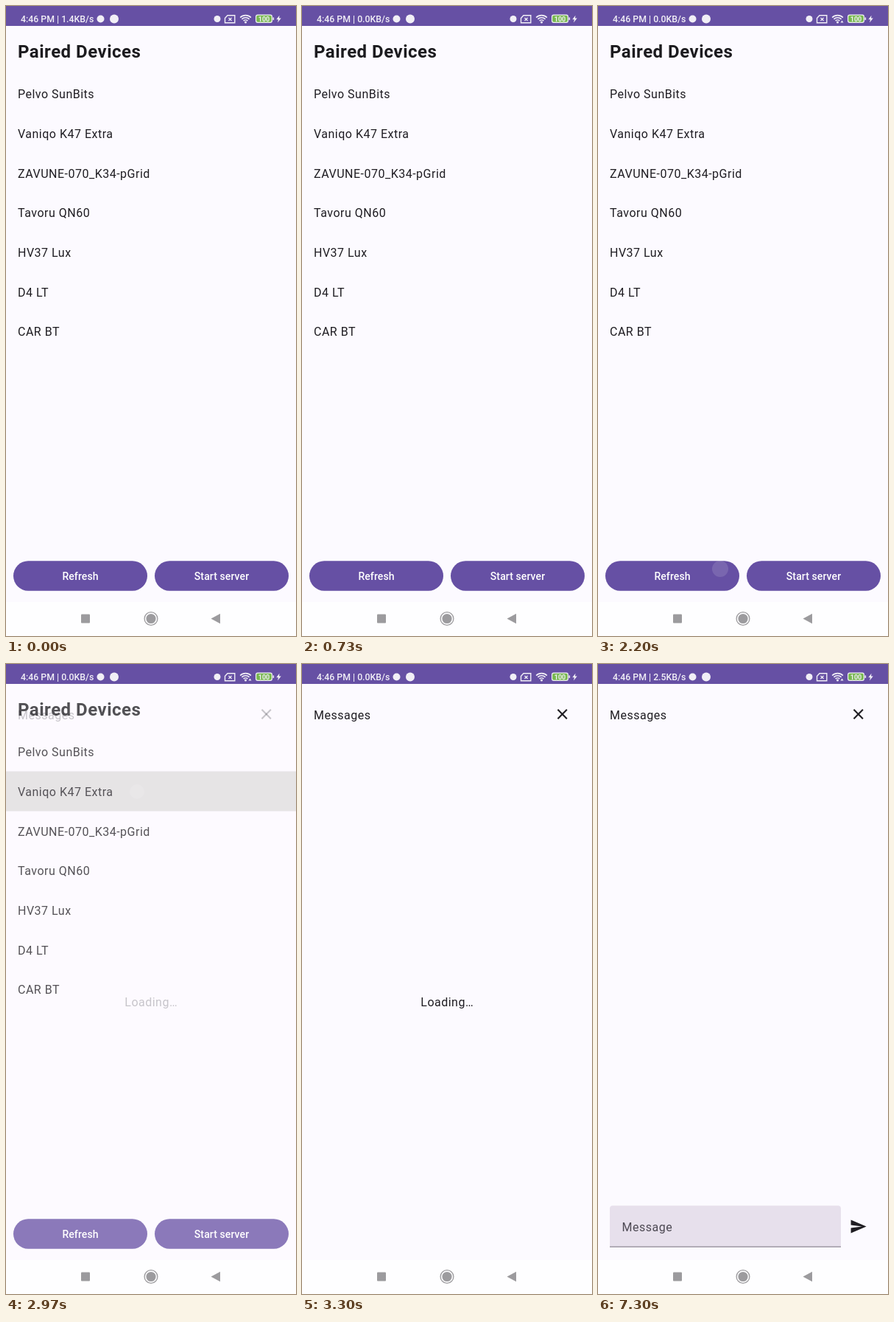
These frames come from a looping animation (394x854 px, 8 s). An HTML page with a canvas:

```html
<!DOCTYPE html>
<html lang="en">
<head>
<meta charset="utf-8">
<title>Paired devices</title>
<style>
html, body { margin: 0; width: 100%; height: 100%; overflow: hidden; background: #fcfaff; }
canvas { display: block; width: 394px; height: 854px; }
</style>
</head>
<body>
<canvas id="stage"></canvas>
<script>
const W = 394, H = 854, LOOP = 8000;
const canvas = document.getElementById('stage');
const ctx = canvas.getContext('2d');
const dpr = window.devicePixelRatio || 1;
canvas.width = Math.round(W * dpr);
canvas.height = Math.round(H * dpr);

const BG = '#fcfaff', INK = '#1f1d22', LIGHT = '#f1eff6', NAV = '#9c9b9e', PURPLE = '#6650a4';
const DEVICES = ['Pelvo SunBits', 'Vaniqo K47 Extra', 'ZAVUNE-070_K34-pGrid',
  'Tavoru QN60', 'HV37 Lux', 'D4 LT', 'CAR BT'];

const ramp = (t, a, b) => Math.min(1, Math.max(0, (t - a) / (b - a)));
const smooth = x => x * x * (3 - 2 * x);

function text(str, x, y, { size = 16, weight = 400, color = INK, gap = 0.5, align = 'left' } = {}) {
  ctx.font = `${weight} ${size}px Roboto, sans-serif`;
  ctx.letterSpacing = gap + 'px';
  ctx.textAlign = align;
  ctx.fillStyle = color;
  ctx.fillText(str, x, y);
}

function box(x, y, w, h, r, color) {
  ctx.beginPath();
  ctx.roundRect(x, y, w, h, r);
  ctx.fillStyle = color;
  ctx.fill();
}

function disc(x, y, r, color) {
  ctx.beginPath();
  ctx.arc(x, y, r, 0, Math.PI * 2);
  ctx.fillStyle = color;
  ctx.fill();
}

function path(points, close) {
  ctx.beginPath();
  points.forEach(([x, y]) => ctx.lineTo(x, y));
  if (close) ctx.closePath();
}

function shape(points, color) {
  path(points, true);
  ctx.fillStyle = color;
  ctx.fill();
}

function cross(x, y, r, width, color) {
  ctx.strokeStyle = color;
  ctx.lineWidth = width;
  for (const s of [1, -1]) {
    path([[x - r, y - r * s], [x + r, y + r * s]]);
    ctx.stroke();
  }
}

function layer(alpha, draw) {
  if (alpha <= 0) return;
  ctx.save();
  ctx.globalAlpha = alpha;
  draw();
  ctx.restore();
}

function wifi(x, y, active) {
  ctx.strokeStyle = LIGHT;
  ctx.lineWidth = 1.6;
  for (const r of [4, 7.2, 10.4]) {
    ctx.beginPath();
    ctx.arc(x, y, r, -Math.PI * 0.75, -Math.PI * 0.25);
    ctx.stroke();
  }
  disc(x, y - 1, 1.5, LIGHT);
  if (active) shape([[x + 4, y - 0.5], [x + 8, y - 0.5], [x + 6, y - 3.5]], LIGHT);
}

function statusBar(t) {
  ctx.fillStyle = PURPLE;
  ctx.fillRect(0, 0, W, 27);
  const rate = t < 700 ? '1.4' : t < 4730 ? '0.0' : '2.5';
  text(`4:46 PM | ${rate}KB/s`, 20, 22, { size: 12.3, weight: 500, color: LIGHT, gap: 0 });
  disc(128.5, 17.5, 5, LIGHT);
  disc(147, 17.5, 6, LIGHT);
  disc(287, 17.5, 4.5, LIGHT);

  path([[301, 12.7], [310.8, 12.7], [310.8, 22.8], [297.5, 22.8], [297.5, 16.5]], true);
  ctx.strokeStyle = LIGHT;
  ctx.lineWidth = 1.4;
  ctx.stroke();
  cross(304.5, 18, 2, 1.3, LIGHT);
  wifi(325.5, 23, (t > 1730 && t < 3300) || t > 5000);

  box(339, 11.5, 23, 11.5, 3, LIGHT);
  box(340.2, 12.7, 20.6, 9.1, 2, '#78b84f');
  box(362.5, 15.3, 1.6, 4, 0.8, LIGHT);
  text('100', 350.5, 20.6, { size: 9, weight: 700, color: LIGHT, gap: 0, align: 'center' });
  shape([[371.5, 12.8], [367.3, 18.2], [370, 18.2], [369, 22.4], [373.8, 16.4], [371, 16.4]], LIGHT);
}

function navBar() {
  ctx.fillStyle = '#fefeff';
  ctx.fillRect(0, 808, W, H - 808);
  box(102, 824.5, 12, 12, 1, NAV);
  disc(197, 830.5, 6.6, NAV);
  ctx.beginPath();
  ctx.arc(197, 830.5, 8.9, 0, Math.PI * 2);
  ctx.strokeStyle = NAV;
  ctx.lineWidth = 1.3;
  ctx.stroke();
  shape([[278.5, 830.5], [291, 823.7], [291, 837.3]], NAV);
}

function button(label, x) {
  box(x, 752.3, 182, 40.4, 20.2, PURPLE);
  text(label, x + 91, 777.5, { size: 14, weight: 500, color: '#fff', gap: 0.1, align: 'center' });
}

function refreshTouch(t) {
  if (t < 1740 || t >= 2550) return;
  const alpha = 0.14 * ramp(t, 1740, 1815) * (1 - ramp(t, 1990, 2170));
  layer(alpha, () => {
    ctx.beginPath();
    ctx.roundRect(10, 752.3, 182, 40.4, 20.2);
    ctx.clip();
    const k = smooth(ramp(t, 1740, 1965));
    disc(166 - 65 * k, 763 + 9.5 * k, 30 + 70 * k, '#fff');
  });
  layer(0.3 - 0.17 * ramp(t, 1990, 2190), () => disc(166, 763, 11, '#fff'));
}

function rowTouch(t) {
  const alpha = ramp(t, 2800, 2880) * (1 - ramp(t, 3050, 3260));
  layer(alpha, () => {
    ctx.beginPath();
    ctx.rect(0, 145.5, W, 54);
    ctx.clip();
    disc(178, 173, 60 + 180 * smooth(ramp(t, 2800, 3000)), '#dedcdd');
  });
  if (t >= 2800 && t < 3070) layer(0.12, () => disc(178, 173, 10, '#fff'));
}

function deviceList(t) {
  rowTouch(t);
  text('Paired Devices', 16, 69.5, { size: 24, weight: 700, color: '#1c1b1f' });
  DEVICES.forEach((name, i) => text(name, 16, 125.4 + i * 53.63));
  button('Refresh', 10);
  button('Start server', 202);
  refreshTouch(t);
}

function messages(t) {
  text('Messages', 16, 74.7);
  cross(353.7, 68, 6.2, 2.1, INK);
  if (t < 3930) {
    text('Loading…', 197.2, 464.2, { align: 'center' });
    return;
  }
  box(16, 734.3, 314, 56.2, [4, 4, 0, 0], '#e7e0ec');
  ctx.fillStyle = '#7b7780';
  ctx.fillRect(16, 789.5, 314, 1);
  text('Message', 32.5, 769, { color: '#4d4953' });
  const icon = [[2, 21], [23, 12], [2, 3], [2, 10], [17, 12], [2, 14]];
  shape(icon.map(([x, y]) => [x + 341.6, y + 750.4]), INK);
}

function render(now) {
  const t = now % LOOP;
  const fade = smooth(ramp(t, 2830, 3270));
  ctx.setTransform(dpr, 0, 0, dpr, 0, 0);
  ctx.fillStyle = BG;
  ctx.fillRect(0, 0, W, H);
  if (fade < 1) deviceList(t);
  // A background veil fades the list as one group.
  layer(fade, () => {
    ctx.fillStyle = BG;
    ctx.fillRect(0, 0, W, H);
    messages(t);
  });
  statusBar(t);
  navBar();
}

let start;
function tick(now) {
  start ??= now;
  render(now - start);
  requestAnimationFrame(tick);
}
requestAnimationFrame(tick);
</script>
</body>
</html>
```
